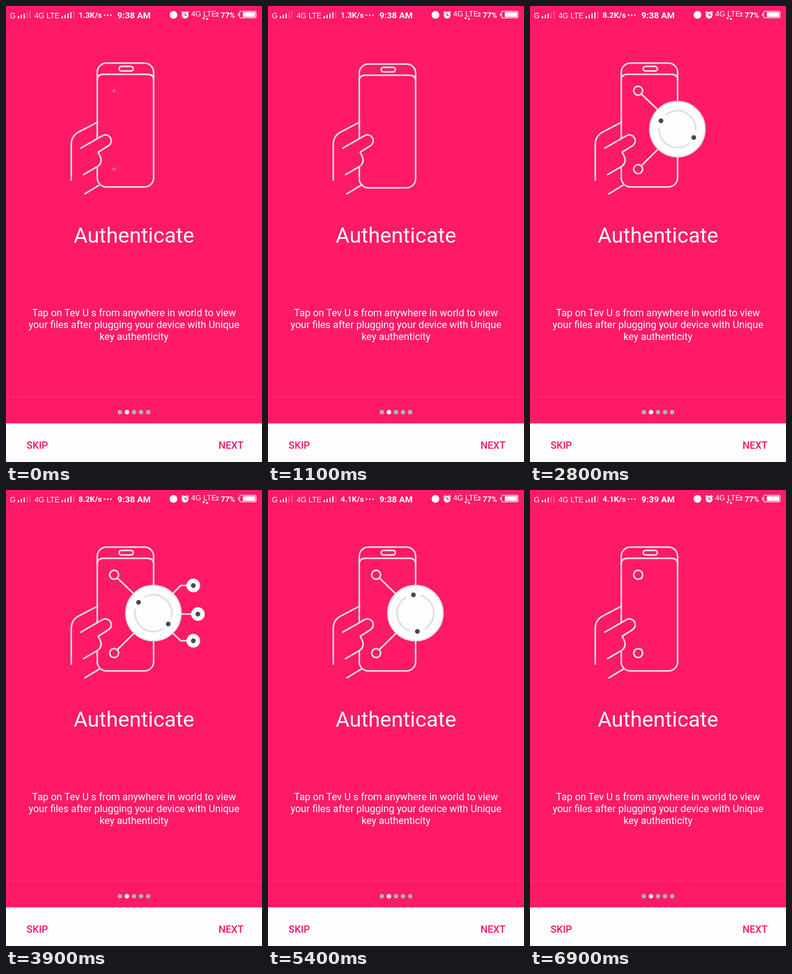
Write an HTML page that moves like this. It is 561x998 px and loops after 7000 ms.

```html
<!DOCTYPE html>
<html lang="en">
<head>
<meta charset="utf-8">
<title>Authenticate</title>
<style>
  html, body { margin: 0; width: 100%; height: 100%; overflow: hidden; background: #fe1a67; }
  svg { display: block; width: 561px; height: 998px; }
  text { font-family: Roboto, sans-serif; fill: #fff; }
  .net { font-family: "Liberation Sans", Arial, sans-serif; font-size: 16.3px; }
  .bold { font-weight: 700; }
  .mid { text-anchor: middle; }
  .body { font-size: 21.8px; }
  .button { font-size: 21.8px; font-weight: 500; fill: #f0156a; }
  .line { fill: none; stroke: #e0dfe2; stroke-width: 3.4; stroke-linecap: round; stroke-linejoin: round; }
  .grow { stroke-linecap: butt; stroke-dasharray: 1 2; }
  .white { fill: #fff; }
  .dot { fill: #4a494c; }
</style>
</head>
<body>
<svg viewBox="0 0 561 998">
  <rect width="561" height="998" fill="#fe1a67"/>

  <g id="status">
    <text class="net" x="8.5" y="27">G</text>
    <text class="net" x="62.5" y="27">4G LTE</text>
    <g id="signal" class="white"></g>
    <text class="bold" id="speed" x="159" y="26" font-size="17.3"></text>
    <g class="white">
      <circle cx="216" cy="20" r="1.8"/><circle cx="223" cy="20" r="1.8"/><circle cx="230" cy="20" r="1.8"/>
    </g>
    <text class="bold" id="clock" x="244" y="26.500" font-size="19.200"></text>
    <circle class="white" cx="367" cy="19.500" r="8.500"/>
    <circle class="white" cx="392.500" cy="20" r="7.500"/>
    <path d="M392.500 15.500V20.500H396.500" fill="none" stroke="#fe1a67" stroke-width="1.800"/>
    <path d="M384.500 15L388.500 11.500M400.500 15L396.500 11.500" stroke="#fff" stroke-width="2"/>
    <text class="net" x="406" y="23">4G</text>
    <text class="net" x="432.500" y="23">LTE</text>
    <text class="bold" x="459.500" y="23" font-size="12">2</text>
    <path class="white" d="M430 25h6l-3 5zM437.500 30h6l-3-5z"/>
    <text class="bold" x="470.500" y="26" font-size="16.800">77%</text>
    <rect x="512" y="11.500" width="36" height="14.500" rx="3" fill="none" stroke="#fff" stroke-width="1.500"/>
    <path class="white" d="M508.500 16h2v6h-2zM519 13.500h27v10.500h-27z"/>
  </g>

  <g id="phone" class="line">
    <rect x="200" y="125" width="123.500" height="271" rx="20"/>
    <path d="M200 162Q200 149.500 214 149.500H309.500Q323.500 149.500 323.500 162"/>
    <rect x="248" y="132.300" width="31" height="10" rx="5"/>
  </g>
  <g class="line">
    <path d="M143 381V304Q143 285 158 276.500L201 254M173 411L206 391"/>
    <path fill="#fe1a67" stroke="none" d="M164 311L212 283.500L225 305.500L202 320L208 340L201 351L170 369z"/>
    <path style="fill:#fe1a67" d="M164 311L212 283.500A12.800 12.800 0 0 1 225 305.500L202 320L206.500 329Q212 343 201 351L170 369"/>
  </g>

  <g class="line">
    <path class="grow link" pathLength="1" d="M244.500 193L283 230"/>
    <path class="grow link" pathLength="1" d="M244.500 349L283 311"/>
    <circle class="node" r="9.700"/>
    <circle class="node" r="9.700"/>
    <path class="grow arm" pathLength="1" d="M364 228L383 209H398"/>
    <path class="grow arm" pathLength="1" d="M383 271.500H408"/>
    <path class="grow arm" pathLength="1" d="M364 312L383 330H398"/>
  </g>
  <g id="satellites"></g>

  <g id="disc">
    <circle r="60.500" fill="#fdfcfe" stroke="#e0dfe2" stroke-width="3"/>
    <g id="dial">
      <circle id="ring" r="40.300" fill="none" stroke="#e0dfe2" stroke-width="3.800" pathLength="360"/>
      <g id="dots">
        <circle class="halo dot" cx="-40.300" r="10"/><circle class="halo dot" cx="40.300" r="10"/>
        <circle class="dot" cx="-40.300" r="5.200"/><circle class="dot" cx="40.300" r="5.200"/>
      </g>
    </g>
  </g>

  <g class="mid">
    <text x="280.500" y="518" font-size="46.750">Authenticate</text>
    <text class="body" x="280.500" y="679">Tap on Tev U s from anywhere in world to view</text>
    <text class="body" x="280.500" y="705">your files after plugging your device with Unique</text>
    <text class="body" x="280.500" y="731">key authenticity</text>
  </g>

  <path d="M0 855.500H561" stroke="#fff" stroke-opacity=".13"/>
  <g id="pager"></g>
  <rect y="913.500" width="561" height="85" fill="#fefdfe"/>
  <text class="button" x="45" y="969">SKIP</text>
  <text class="button" x="520.500" y="969" text-anchor="end">NEXT</text>
</svg>
<script>
const LOOP = 7000, STEP = 100;
const $ = id => document.getElementById(id);
const all = selector => [...document.querySelectorAll(selector)];
const clamp = x => Math.min(1, Math.max(0, x));
const ramp = (t, a, b) => { const p = clamp((t - a) / (b - a)); return p * p * (3 - 2 * p); };
const pulse = (t, a, b, c, d) => ramp(t, a, b) - ramp(t, c, d);

const nodeY = [185.5, 357];
const satellites = [[410.5, 209], [420.5, 271.5], [410.5, 330]];
const turns = [[2400, -36], [2800, 27], [2900, 27], [3900, 216], [4900, 361], [6100, 560], [7000, 705]];

// Signal strength: five rising bars, the last ones faint.
const bars = (x, lit) => [0, 1, 2, 3, 4].map(i => {
  const height = 5 + 2.8 * i;
  return `<rect x="${x + 6.3 * i}" y="${27 - height}" width="2.6" height="${height}" opacity="${i < lit ? 1 : 0.25}"/>`;
}).join('');
$('signal').innerHTML = bars(26, 3) + bars(122, 4);

$('pager').innerHTML = [0, 1, 2, 3, 4].map(i =>
  `<circle cx="${249.5 + 15.5 * i}" cy="889" r="5" fill="${i === 1 ? '#fff' : '#b3aeb5'}"/>`).join('');
$('satellites').innerHTML = satellites.map(([x, y]) =>
  `<g transform="translate(${x} ${y})"><circle r="15" fill="#fdfcfe"/><circle class="dot" r="5.2"/></g>`).join('');

const links = all('.link'), arms = all('.arm'), nodes = all('.node'), halos = all('.halo');

function angle(t) {
  const i = Math.max(1, turns.findIndex(([time]) => t < time));
  const [t0, a0] = turns[i - 1], [t1, a1] = turns[i];
  return a0 + (a1 - a0) * clamp((t - t0) / (t1 - t0));
}

const reveal = (paths, p) => paths.forEach(path => {
  path.style.strokeDashoffset = 1 - p;
  path.style.visibility = p > 0 ? 'visible' : 'hidden';
});
const place = (el, transform) => el.setAttribute('transform', transform);

function draw(t) {
  const late = t < 600 ? t + LOOP : t; // the outro runs across the loop point

  $('speed').textContent = (t < 1700 ? '1.3' : t < 5000 ? '8.2' : '4.1') + 'K/s';
  $('clock').textContent = t < 6500 ? '9:38 AM' : '9:39 AM';

  const dip = t < 1300 ? 9 * Math.sin(Math.PI * t / 1300) ** 2 : 0;
  place($('phone'), `translate(0 ${dip})`);

  const node = pulse(late, 1200, 1500, 6900, 7050);
  nodes.forEach((el, i) => place(el, `translate(237 ${nodeY[i]}) scale(${node})`));
  reveal(links, pulse(late, 1500, 1900, 6500, 6950));
  reveal(arms, pulse(t, 3000, 3500, 5000, 5400));

  const out = pulse(t, 3400, 3900, 4700, 5350);
  place($('satellites'), `translate(${20 * (out - 1)} 0)`);
  $('satellites').style.opacity = clamp(out * 1.1);

  place($('disc'), `translate(323 269.5) scale(${pulse(t, 1800, 2300, 6300, 6750)})`);
  place($('dial'), `rotate(${angle(t)})`);
  const gap = 46 * pulse(t, 2500, 2800, 5600, 6100);
  $('ring').style.strokeDasharray = gap ? `${180 - gap} ${gap}` : 'none';
  $('ring').style.strokeDashoffset = -gap / 2;
  $('dots').style.opacity = pulse(t, 2200, 2600, 6000, 6300);
  const halo = pulse(t, 2200, 2500, 2500, 2800) + ramp(t, 5600, 6000);
  halos.forEach(el => el.style.opacity = 0.45 * halo);
}

function tick() {
  draw(Math.floor(performance.now() % LOOP / STEP) * STEP);
  requestAnimationFrame(tick);
}
tick();
</script>
</body>
</html>
```
